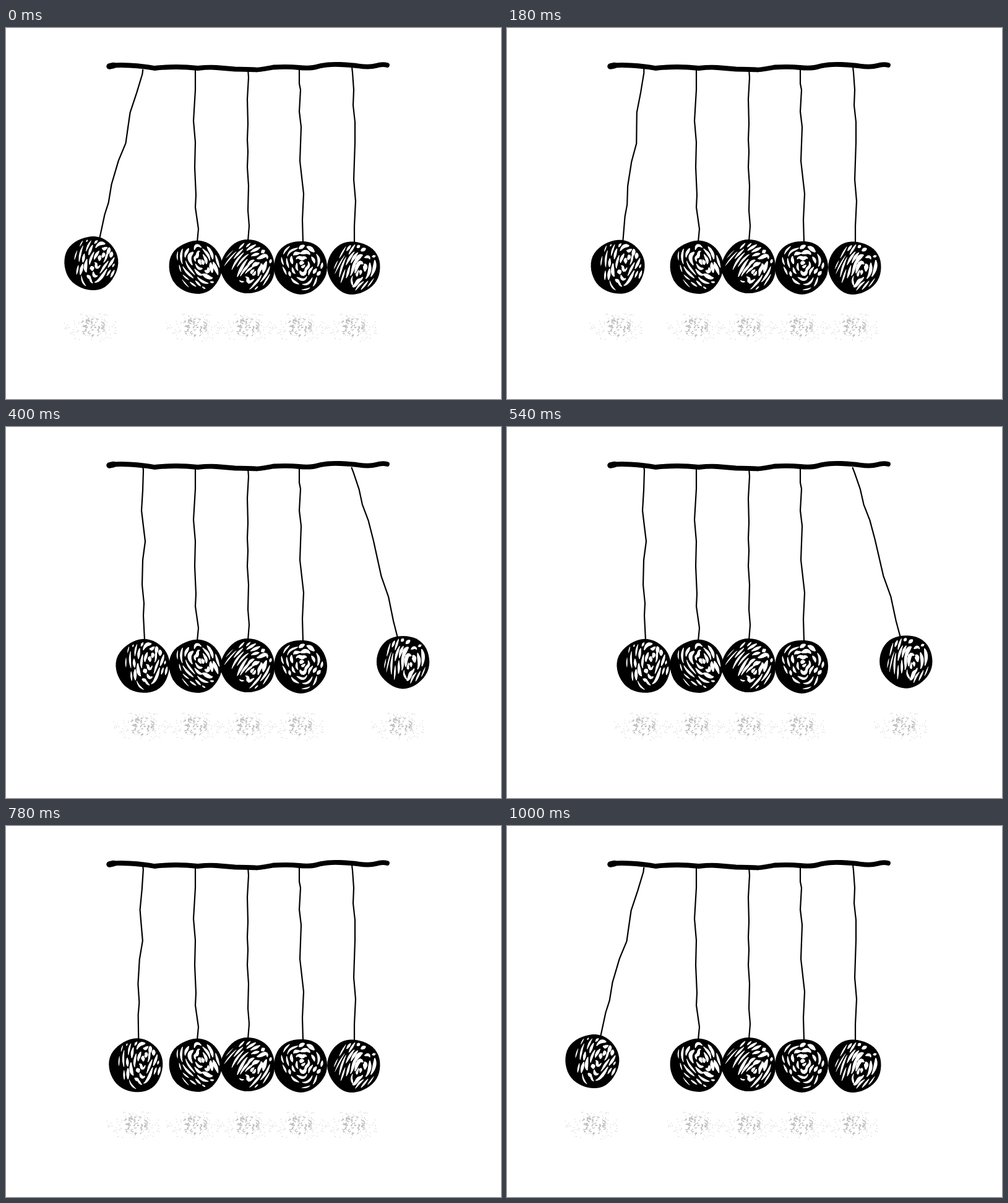
An HTML page for the animation above (1020 ms loop, 800x600 px).

```html
<!DOCTYPE html>
<html lang="en">
<head>
<meta charset="utf-8">
<title>Swinging wooden balls</title>
<style>
  html, body { margin: 0; width: 100%; height: 100%; overflow: hidden; background: #fff; }
  svg { display: block; width: 800px; height: 600px; }
  .line { fill: none; stroke: #000; stroke-linecap: round; stroke-linejoin: round; }
</style>
</head>
<body>
<svg id="stage" viewBox="0 0 800 600"></svg>
<script>
const LOOP = 1020, STEP = 20, SWING = 15, SHADOW_REACH = 80;
const stage = document.getElementById('stage');

// x, y, r: ball; knot: x, y, width, height, tilt of the wood grain
const balls = [
  { x: 221.5, y: 386.7, r: 43.5, knot: [13, -14, .8, 1.7, .22], seed: 11,
    string: 'M221 63L222 70 221 102 219 135 221 152 225 185 221 215 220 255 223 285 222 305 224 345' },
  { x: 306.7, y: 386.7, r: 43, knot: [9, -8, .85, 1.5, -.45], seed: 23,
    string: 'M306 66L306 100 303 150 306 185 305 225 307 270 306 290 311 325 309 346' },
  { x: 391.2, y: 385.9, r: 43.6, knot: [9, 9, .8, 1.7, .6], seed: 37,
    string: 'M391 66L392 80 390 115 391 155 390 180 391 200 390 225 392 255 391 295 393 320 391 345' },
  { x: 476, y: 386.9, r: 43, knot: [3, -4, 1, 1.25, .1], seed: 41,
    string: 'M474 66L474 90 476 100 474 135 477 160 475 215 481 268 479 310 480 347' },
  { x: 561.8, y: 387.7, r: 42.7, knot: [8, 10, .75, 1.9, .45], seed: 59,
    string: 'M559 63L560 72 562 100 561 125 564 152 564 185 562 245 565 280 563 320 563 347' }
];

function random(seed) {
  return () => (seed = (seed * 16807) % 2147483647) / 2147483647;
}

function add(parent, tag, attrs = {}) {
  const el = document.createElementNS('http://www.w3.org/2000/svg', tag);
  for (const key in attrs) el.setAttribute(key, attrs[key]);
  return parent.appendChild(el);
}

function addLine(parent, d, width, stroke = '#000') {
  return add(parent, 'path', { class: 'line', d, style: `stroke:${stroke};stroke-width:${width}` });
}

const line = points => 'M' + points.map(p => p.map(v => v.toFixed(1)).join(' ')).join('L');
const clamp = v => Math.max(0, Math.min(1, v));

function outline(r, seed) {
  return line(Array.from({ length: 48 }, (_, i) => {
    const a = i * Math.PI / 24;
    const q = r + .6 * Math.sin(3 * a + seed) + .4 * Math.sin(5 * a + 2 * seed);
    return [q * Math.cos(a), q * Math.sin(a)];
  })) + 'Z';
}

// A gouge: pointed at both ends, as wide as given in the middle
function gouge(points, width) {
  const last = points.length - 1;
  const side = sign => points.map(([x, y], i) => {
    const [ax, ay] = points[Math.max(0, i - 1)], [bx, by] = points[Math.min(last, i + 1)];
    const size = Math.hypot(bx - ax, by - ay) || 1;
    const half = sign * width / 2 * (.25 + .75 * Math.sin(Math.PI * i / last));
    return [x - (by - ay) / size * half, y + (bx - ax) / size * half];
  });
  return line([...side(1), ...side(-1).reverse()]) + 'Z';
}

// White gouges follow the grain round the knot and thin out in the shade
function grain({ r: size, knot: [kx, ky, sx, sy, tilt], seed }) {
  const rand = random(seed * 7919);
  const cos = Math.cos(tilt), sin = Math.sin(tilt);
  const at = (a, r) => {
    const q = r + (1.8 * Math.sin(3 * a + seed) + 1.2 * Math.sin(5 * a + r / 9)) * Math.min(1, r / 14);
    const u = q * sx * Math.cos(a), v = q * sy * Math.sin(a);
    return [kx + u * cos - v * sin, ky + u * sin + v * cos];
  };
  let d = '';
  for (let r = 3; r < 95; r += 7.2) {
    let a = rand() * 6.28;
    const end = a + 6.28;
    while (a < end) {
      const span = Math.min(2.2, (7 + rand() * 13) / r);
      const drift = (rand() - .5) * 5;
      const points = Array.from({ length: 9 }, (_, i) => at(a + span * i / 8, r + drift * (i / 8 - .5)))
        .filter(([x, y]) => Math.hypot(x, y) < size - 4.5);
      const mid = a + span / 2;
      a += span + (1.5 + rand() * 3.5) / r;
      if (points.length < 3) continue;
      const [mx, my] = points[points.length >> 1];
      const light = clamp((44 - Math.hypot(mx - 10, my + 6)) / 20);
      if (light < .08 || rand() > .65 + light * .5) continue;
      const gap = 7.2 * Math.hypot(sx * Math.cos(mid), sy * Math.sin(mid));
      d += gouge(points, Math.min(6, gap * .68) * (.35 + .65 * light) * (.75 + .5 * rand()));
    }
  }
  return d;
}

// Grey scatter: wormy flecks in the core, loose dots round it
function drawShadow({ x }) {
  const rand = random(4242);
  const group = add(stage, 'g');
  const spot = add(group, 'g', { transform: `translate(${x - 2.3} 483.5)` });
  let flecks = '', dots = '';
  for (let i = 0; i < 52; i++) {
    const a = rand() * 6.28, q = Math.sqrt(rand());
    const px = 20 * q * Math.cos(a), py = 16 * q * Math.sin(a);
    const dx = (rand() - .5) * 6, dy = (rand() - .5) * 5;
    flecks += line([[px, py], [px + dx, py + dy], [px + dx + 1.5, py + dy - 1]]);
  }
  for (let i = 0; i < 75; i++) {
    const a = rand() * 6.28, q = .45 + .55 * rand();
    dots += line([[47 * q * Math.cos(a), 24 * q * Math.sin(a)]]) + `l${rand().toFixed(1)} .5`;
  }
  addLine(spot, flecks, 1.2, '#b8b8b8');
  addLine(spot, dots, 1, '#c4c4c4');
  return group;
}

function drawBall(ball) {
  const group = add(stage, 'g');
  addLine(group, ball.string, 2.2);
  const body = add(group, 'g', { transform: `translate(${ball.x} ${ball.y})` });
  add(body, 'path', { d: outline(ball.r, ball.seed) });
  add(body, 'path', { d: grain(ball), fill: '#fff' });
  return group;
}

const shadows = balls.map(drawShadow);
const bodies = balls.map(drawBall);

addLine(stage, 'M167 62Q175 59 200 60.5T240 65Q258 63 275 63T310 65Q328 63 340 64T370 66.5Q400 67 404 67.5T432 63.5Q455 62 474 64T505 62Q520 58 540 59T570 61.5Q588 64 598 61T616 60', 7.8);
addLine(stage, 'M167 62L174 60.5', 9.5);

const fall = (t, start, end, power) => 1 - clamp((t - start) / (end - start)) ** power;
const rise = (t, start, end) => 1 - (1 - clamp((t - start) / (end - start))) ** 3;

function leftSwing(t) {
  return t < 500 ? fall(t, 0, 250, 2.12) : rise(t, 769, 1005);
}

function rightSwing(t) {
  return t < 487 ? rise(t, 251, 482) : fall(t, 491, 767, 3);
}

function pose(index, amount, side, pivot) {
  bodies[index].setAttribute('transform', `rotate(${-side * SWING * amount} ${pivot} 66)`);
  shadows[index].setAttribute('transform', `translate(${side * SHADOW_REACH * amount} 0)`);
}

function frame() {
  const t = Math.floor((performance.now() % LOOP) / STEP) * STEP;
  pose(0, leftSwing(t), -1, 204);
  pose(4, rightSwing(t), 1, 570);
  requestAnimationFrame(frame);
}
frame();
</script>
</body>
</html>
```
